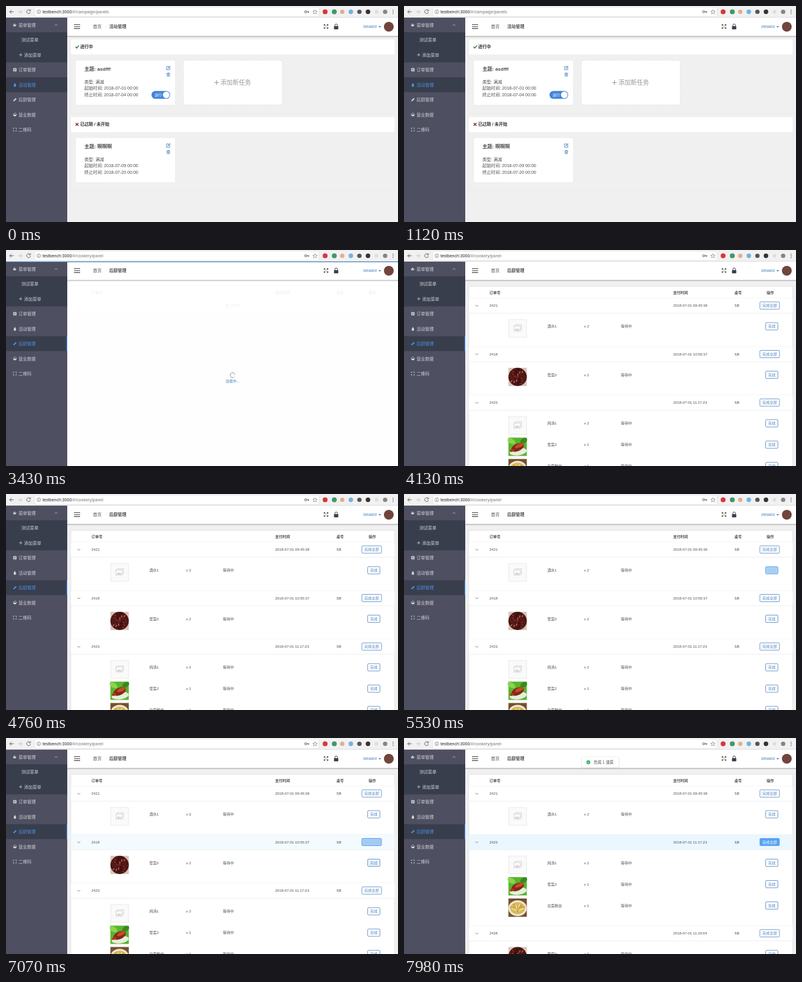
These frames come from a looping animation (640 by 354 pixels, 8000 ms). An HTML page:

```html
<!DOCTYPE html>
<html lang="zh-CN">
<head>
<meta charset="utf-8">
<title>订单后台</title>
<style>
html, body { margin: 0; width: 100%; height: 100%; overflow: hidden; background: #fff; }
svg { display: block; width: 100%; height: 100%; font-family: "Liberation Sans", "Noto Sans CJK SC", "Noto Sans CJK", sans-serif; }
text { white-space: pre; }
</style>
</head>
<body>
<svg id="stage" viewBox="0 0 640 354"></svg>
<script>
const LOOP = 8000;
const CLICK_MENU = 2010, OPEN_PAGE = 2080, LOADED = 3680, ORDER_DONE = 7500;
const BLUE = '#4a82bd', HOVER = '#57a3f3', INK = '#4a4c50', LINE = '#e6e8eb';

const clamp = v => Math.max(0, Math.min(1, v));
const ramp = (t, start, length) => clamp((t - start) / length);
const pulse = (t, from, to) => ramp(t, from, 200) - ramp(t, to, 200);
const mix = (a, b, k) => 'rgb(' + [1, 3, 5].map(i => {
  const [x, y] = [a, b].map(c => parseInt(c.slice(i, i + 2), 16));
  return Math.round(x + (y - x) * k);
}) + ')';

// Drawing helpers; text is placed by its vertical centre.
const rect = (x, y, w, h, fill, extra = '') => `<rect x="${x}" y="${y}" width="${w}" height="${h}" fill="${fill}" ${extra}/>`;
const circle = (x, y, r, fill, extra = '') => `<circle cx="${x}" cy="${y}" r="${r}" fill="${fill}" ${extra}/>`;
const ellipse = (x, y, rx, ry, fill, turn = 0) => `<ellipse rx="${rx}" ry="${ry}" fill="${fill}" transform="translate(${x} ${y}) rotate(${turn})"/>`;
const stroke = (d, color, w = 1, extra = '') => `<path d="${d}" fill="none" stroke="${color}" stroke-width="${w}" ${extra}/>`;
const shape = (d, fill) => `<path d="${d}" fill="${fill}"/>`;
const at = (x, y, body, extra = '') => `<g transform="translate(${x} ${y})" ${extra}>${body}</g>`;
const text = (x, y, s, size = 6, fill = INK, extra = '') =>
  `<text x="${x}" y="${y + size * .36}" font-size="${size}" fill="${fill}" ${extra}>${s}</text>`;
const bold = (x, y, s, size, fill = INK) => text(x, y, s, size, fill, 'font-weight="700"');

function browserBar(t) {
  const path = t < CLICK_MENU ? 'campaign/panels' : 'cookery/panel';
  const gray = '#666';
  return rect(0, 0, 640, 19, '#f1f1f1') + rect(47, 2, 464, 15, '#fff', 'rx="2" stroke="#dcdcdc" stroke-width=".6"') +
    rect(0, 18.5, 640, .6, '#cfcfcf') +
    stroke('M12.5 9.5H6M9 6.5l-3 3 3 3', gray) + stroke('M19.5 9.5H26M23 6.5l3 3-3 3', '#c4c4c4') +
    stroke('M39.4 7.2A3.2 3.2 0 1 0 40 10M40 5.6V8h-2.6', gray) +
    circle(53.5, 9.5, 3, 'none', 'stroke="#666" stroke-width=".7"') + stroke('M53.5 9v2.3M53.5 7.4v.8', gray, .8) +
    text(59.5, 9.8, `testbench:3000<tspan fill="#777">/#/${path}</tspan>`, 7, '#222') +
    circle(489.3, 9.5, 1.7, 'none', 'stroke="#555" stroke-width="1"') + stroke('M491 9.5h4M493.7 9.5v1.6', '#555') +
    stroke('M504.5 6l1 2.4 2.6.2-2 1.7.7 2.6-2.3-1.4-2.3 1.4.7-2.6-2-1.7 2.6-.2z', '#777', .7) +
    circle(521, 9.5, 4, '#d6393d') + circle(536, 9.5, 4, '#43966d') + circle(549, 9.5, 3.5, '#e0ad91') +
    circle(563, 9.5, 3.7, '#74b3e1') + circle(577, 9.5, 3.6, '#555') + circle(591, 9.5, 3.7, '#333') +
    circle(605, 9.5, 3, '#dedede') + circle(619, 9.5, 3.6, '#858585') +
    [6.7, 9.5, 12.3].map(y => circle(632, y, .8, '#555')).join('');
}

function progressBar(t) {
  const alpha = 1 - ramp(t, LOADED, 300);
  const width = 640 * ramp(t, CLICK_MENU, 400);
  return rect(0, 18.9, width, 1.1, '#3f7fc4', `opacity="${alpha}"`);
}

const menuIcons = {
  pot: c => shape('M-2.7-.5h4.2v2.8h-4.2zM-1.7-2h2.2v1h-2.2z', c) + stroke('M1.5.3h1.4', c, .8),
  list: c => rect(-2.7, -2.7, 5.4, 5.4, c, 'rx=".7"') + stroke('M-1.5-1h3M-1.5.4h3M-1.5 1.6h2', '#4e5061', .6),
  drop: c => shape('M0-3C1-1 2.3 0 2 1.4A2 2 0 0 1-2 1.4C-2.3 0-1-1 0-3z', c),
  pen: c => shape('M-2.7 2.7l.6-2 3.5-3.4 1.5 1.5-3.6 3.4z', c),
  chart: c => circle(0, 0, 2.5, 'none', `stroke="${c}" stroke-width=".7"`) + shape('M-2.5 0h5a2.5 2.5 0 0 1-5 0z', c),
  scan: c => stroke('M-2.5-1v-1.5H-1M1-2.5h1.5V-1M2.5 1v1.5H1M-1 2.5h-1.5V1', c, .9)
};

function sidebar(t) {
  const idle = '#d0d2d9';
  const activeY = t < OPEN_PAGE ? 129 : 153.5;
  const hovered = t >= 1750 && t < OPEN_PAGE;
  const item = (y, label, icon) => {
    const color = y === activeY ? '#4a91e4' : y === 153.5 && hovered ? '#fff' : idle;
    return at(14.5, y, menuIcons[icon](color)) + text(20.5, y, label, 7, color);
  };
  return rect(0, 19, 100, 335, '#4e5061') + rect(0, 43, 100, 49.5, '#393e4d') +
    rect(0, activeY - 12.2, 100, 24.4, '#393e4d') +
    (t < OPEN_PAGE ? '' : rect(98.7, activeY - 12.2, 1.3, 24.4, '#3f83d6')) +
    item(31, '菜单管理', 'pot') + stroke('M79.5 32.2l2.2-2.2 2.2 2.2', idle, .7) +
    text(25, 55.5, '测试菜单', 7, idle) + stroke('M21.5 80h5M24 77.5v5', idle, .8) + text(29.5, 80, '添加菜单', 7, idle) +
    item(104.5, '订单管理', 'list') + item(129, '活动管理', 'drop') + item(153.5, '后厨管理', 'pen') +
    item(178, '营业数据', 'chart') + item(202.5, '二维码', 'scan');
}

function header(t) {
  return rect(100, 49, 540, 1, '#000', 'opacity=".22"') + rect(100, 50, 540, 1, '#000', 'opacity=".12"') +
    rect(100, 51, 540, 1, '#000', 'opacity=".04"') + rect(100, 19, 540, 30, '#fff') +
    stroke('M111 30.5h10M111 33.7h10M111 36.9h10', '#444', 1.1) +
    text(142, 33.5, '首页', 7) + text(162.5, 33.5, '/', 6, '#dcdde0') +
    bold(168.5, 33.5, t < OPEN_PAGE ? '活动管理' : '后厨管理', 7) +
    stroke('M519.3 32.3v-2h2M523.7 30.3h2v2M525.7 34.9v2h-2M521.3 36.9h-2v-2M519.5 30.5l2.2 2.2M525.5 30.5l-2.2 2.2M525.5 36.7l-2.2-2.2M519.5 36.7l2.2-2.2', '#333', .9) +
    rect(535.5, 33, 7, 5.3, '#3a3e4c', 'rx=".7"') + stroke('M537 33v-1.4a2.1 2.1 0 0 1 4.2 0V33', '#3a3e4c', 1) +
    text(583, 34, 'steward', 6.3, BLUE) + shape('M608 33h4.4l-2.2 2.5z', BLUE) +
    circle(625, 34, 8, '#71443c');
}

function promotionCard(y, title, from, to) {
  const line = (dy, s) => text(128, y + dy, s, 7.05);
  return rect(113.5, y, 163, 73.5, '#fff', `rx="2" stroke="#e6e7e9" stroke-width=".6"`) +
    bold(128, y + 13.7, title, 8) + line(35, '类型: 满减') +
    line(45.5, `起始时间: ${from} 00:00`) + line(56, `终止时间: ${to} 00:00`) +
    at(265, y + 12.5, stroke('M1-2.5h-4v5.5h5.5V-.5', BLUE, .8) + stroke('M-1 1l4-4', BLUE, 1.1)) +
    at(265, y + 23.5, stroke('M-3-2.1h6M-1-3h2', BLUE, .8) + stroke('M-2-1.5v4h4v-4M-.6-1v2.6M.8-1v2.6', BLUE, .8));
}

function promotionPage() {
  const section = (y, h, label) =>
    rect(106, y, 528.5, h, 'none', 'rx="2" stroke="#eaeaea" stroke-width=".6"') +
    rect(106, y, 528.5, 25, '#fff', 'rx="2"') + bold(121, y + 12.2, label, 7, '#333');
  return rect(100, 49, 540, 305, '#f0f0f0') +
    section(54.5, 122, '进行中') + stroke('M113.5 66.8l2 2.2 3.6-4.4', '#2b6f35', 1.4) +
    section(181.7, 122, '已过期 / 未开始') + stroke('M113.7 191.7l4.6 4.6M118.3 191.7l-4.6 4.6', '#8f2430', 1.4) +
    promotionCard(89, '主题: asdfff', '2018-07-01', '2018-07-04') +
    promotionCard(216, '主题: 啊啊啊', '2018-07-09', '2018-07-20') +
    rect(237.5, 139.2, 30.5, 12.8, '#4284dc', 'rx="6.4"') + circle(261.6, 145.6, 5.4, '#fff') + text(242.5, 145.6, '进行', 6, '#fff') +
    rect(289.5, 89, 161.5, 73, '#fff', 'rx="3" stroke="#dedede" stroke-width=".8" stroke-dasharray="3 2"') +
    stroke('M340 125.5h7.5M343.7 121.7v7.6', '#999', 1.1) + text(350, 125.5, '添加新任务', 10, '#999');
}

const dishes = {
  blank: rect(.4, .4, 29.2, 29.2, '#fafafa', 'stroke="#d5d5d5" stroke-width=".7" stroke-dasharray="2 1"') +
    stroke('M11 11V9h10.5v8H20', '#d2d2d2', .9) + rect(9, 11, 10.5, 8.5, '#fafafa', 'stroke="#d2d2d2" stroke-width=".9"') +
    shape('M10 18.5l3-4 2 2.2 1.5-1.3 2.2 3.1z', '#d2d2d2'),
  chili: rect(0, 0, 30, 30, '#d8c5bb') + circle(15, 15, 15, '#4a1715') +
    Array.from({ length: 26 }, (_, i) => {
      const a = i * 2.4, r = 2.6 * Math.sqrt(i);
      return ellipse(15 + r * Math.cos(a), 15 + r * Math.sin(a), 2.2, 1, ['#8d2820', '#642019', '#b6574a', '#2f100f'][i % 4], i * 47);
    }).join(''),
  meat: rect(0, 0, 30, 30, '#58b52d') + ellipse(5, 6, 7, 4, '#8bd44c', 30) + ellipse(25, 5, 6, 4, '#348b22', -30) +
    ellipse(16, 23, 14, 6, '#e6eddc', -8) + ellipse(15, 16, 11, 6, '#812a17', -25) +
    ellipse(18, 13, 8, 3, '#c54c27', -25) + ellipse(6, 21, 4, 2, '#ad371d', -20),
  noodles: rect(0, 0, 30, 30, '#76502f') + ellipse(15, 16, 15, 13, '#eee7d4') + ellipse(15, 16, 12, 10, '#d9ba59') +
    Array.from({ length: 9 }, (_, i) => ellipse(7 + i * 2, 15 + 3 * Math.sin(i * 2), 1, 5, i % 2 ? '#f0df9b' : '#c79c3b', i * 20 - 80)).join('')
};

const orders = {
  2421: { time: '09:45:38', items: [['blank', '酒水1', 2]] },
  2418: { time: '10:55:37', items: [['chili', '荤菜0', 2]] },
  2423: { time: '11:17:23', items: [['blank', '炖汤1', 2], ['meat', '荤菜2', 1], ['noodles', '白菜粉丝', 1]] },
  2428: { time: '11:19:04', items: [['chili', '荤菜0', 2]] }
};

function button(centre, y, label, hover) {
  const w = label.length * 6 + 8;
  return rect(centre - w / 2, y - 6, w, 12, mix('#ffffff', HOVER, hover),
      `rx="1.5" stroke="${mix(BLUE, HOVER, hover)}" stroke-width=".8"`) +
    text(centre, y, label, 6, mix(BLUE, '#ffffff', hover), 'text-anchor="middle"');
}

function orderRows(t) {
  const ids = t < ORDER_DONE ? [2421, 2418, 2423] : [2421, 2423, 2428];
  // Hover strength by the vertical centre of the button under the pointer.
  const hovers = { 125: pulse(t, 5430, 6050), 170.5: ramp(t, 6960, 200), 205: pulse(t, 6280, 6900) };
  let top = 79, out = '';
  for (const id of ids) {
    const { time, items } = orders[id], y = top + 12, hover = hovers[y] || 0;
    out += rect(106, top, 528.5, 24.5, mix('#ffffff', '#ebf7ff', hover)) +
      stroke(`M116.7 ${y - .8}l2.2 2.2 2.2-2.2`, '#666', .8) + text(139.5, y, id) +
      text(439.5, y, `2018-07-01 ${time}`) + text(539.5, y, 'SB') + button(597, y, '完成全部', hover);
    items.forEach(([dish, name, count], i) => {
      const rowY = top + 46 + i * 35;
      out += at(170.5, top + 34.5 + i * 35, dishes[dish]) + text(234, rowY, name) +
        text(294, rowY, `x ${count}`) + text(354, rowY, '等待中') +
        button(600.5, rowY, '完成', ids[1] === 2418 && hovers[Math.round(rowY)] || 0);
    });
    const bottom = top + 44.5 + items.length * 35;
    out += stroke(`M106 ${top + 24.5}H634.5M106 ${bottom}H634.5`, LINE, .7);
    top = bottom;
  }
  return out;
}

function loadingMask(t) {
  const alpha = ramp(t, OPEN_PAGE, 200) - ramp(t, LOADED, 200);
  if (!alpha) return '';
  return `<g opacity="${alpha}">` + rect(100, 49, 540, 305, '#fff', 'opacity=".92"') +
    at(370, 205, stroke('M0-4A4 4 0 1 1-4 0', '#858b94', .9, `transform="rotate(${(t * .36 % 360).toFixed(1)})"`) +
      circle(0, 0, 4, 'none', 'stroke="#c8ccd2" stroke-width=".6"')) +
    text(370, 215.3, '加载中...', 6, BLUE, 'text-anchor="middle"') + '</g>';
}

function kitchenPage(t) {
  const ready = t >= LOADED;
  const head = [[139.5, '订单号'], [439.5, '支付时间'], [539.5, '桌号'], [592, '操作']];
  return rect(100, 49, 540, 305, '#f0f0f0') +
    rect(106, 59.5, 528.5, ready ? 300 : 43, '#fff', 'stroke="#dddee1" stroke-width=".7"') +
    head.map(([x, s]) => bold(x, 69.5, s, 6)).join('') + stroke('M106 79H634.5', LINE, .7) +
    (ready ? orderRows(t) : text(370, 90.5, '暂无数据', 6, INK, 'text-anchor="middle"')) + loadingMask(t);
}

function toast(t) {
  const k = 1 - (1 - ramp(t, ORDER_DONE, 300)) ** 2;
  if (!k) return '';
  return at(0, (k - 1) * 18, rect(289, 31.2, 62.5, 18.5, '#000', 'rx="2" opacity=".1"') +
    rect(289.5, 30.8, 61.5, 18, '#fff', 'rx="2" stroke="#e3e3e3" stroke-width=".5"') +
    circle(301, 39.7, 3.2, '#35b36b') + stroke('M299.5 39.7l1.1 1.2 2-2.3', '#fff', .8) +
    text(309.5, 39.8, '完成 1 道菜', 6.4), `opacity="${k}"`);
}

const stage = document.getElementById('stage');
let shown = '';
function draw(now) {
  const t = now % LOOP;
  const page = t < OPEN_PAGE ? promotionPage() : kitchenPage(t);
  const picture = page + header(t) + sidebar(t) + toast(t) + browserBar(t) + progressBar(t);
  if (picture !== shown) stage.innerHTML = shown = picture;
  requestAnimationFrame(draw);
}
draw(performance.now());
</script>
</body>
</html>
```
